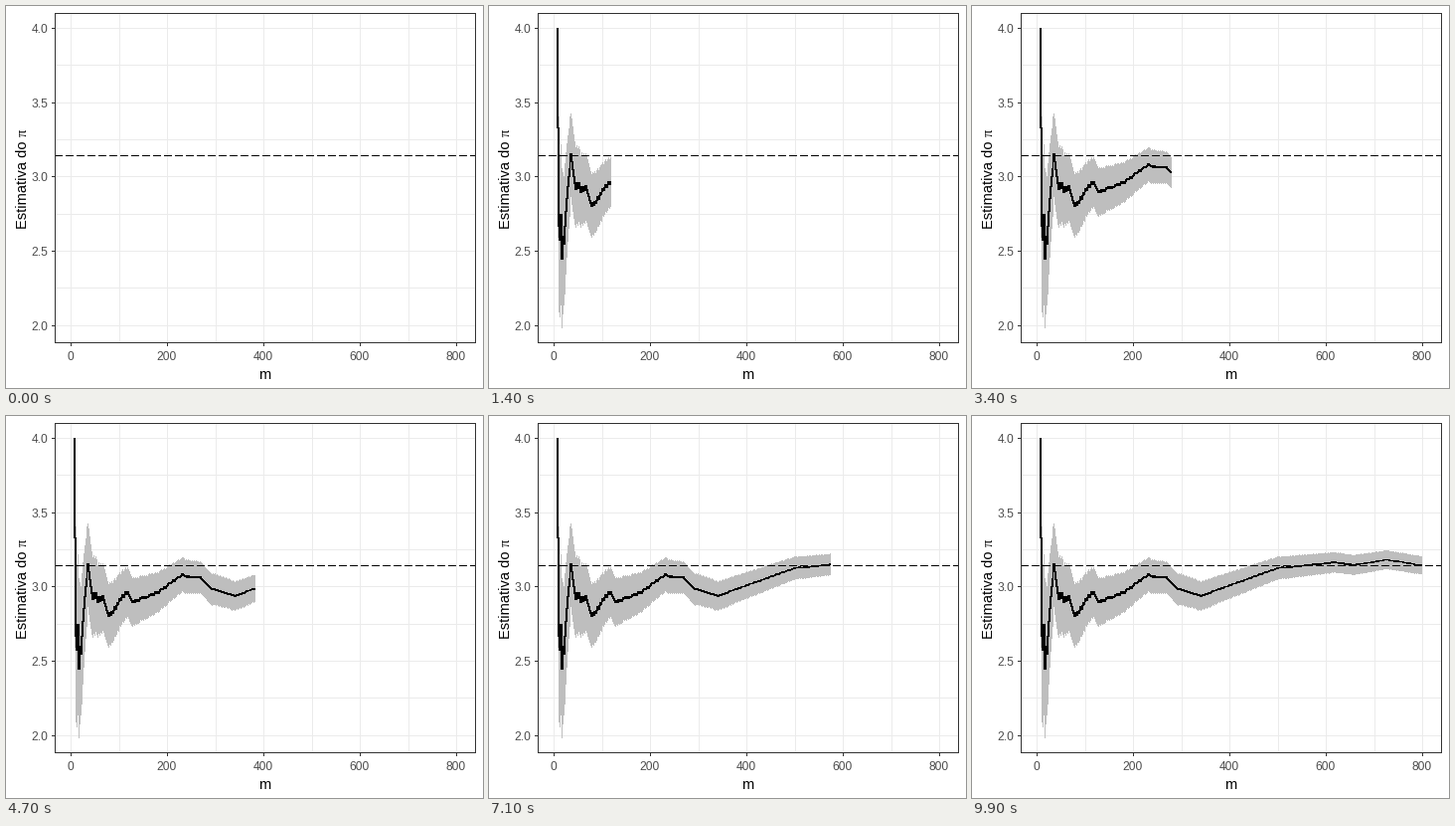
Animation, 480 px wide and 384 px high, one loop 10 s. Source, as a matplotlib script:

```python
import numpy as np
import matplotlib.pyplot as plt
from matplotlib.animation import FuncAnimation
from matplotlib.patches import Polygon

W, H, DPI = 480, 384, 100
PX = 72 / DPI  # points per pixel
FRAMES, STEP = 100, 8
LEFT, RIGHT, TOP, BOTTOM = 49, 472, 7, 338
GRID, EDGE, BAND, TICK_TEXT = "#ebebeb", "#333333", "#bebebe", "#4d4d4d"

# Turning points (m, estimate) that the simulated throws steer towards
TREND = np.array([
    (8, 4.0), (12, 2.667), (16, 2.75), (18, 2.44), (37, 3.135),
    (47, 2.93), (70, 2.92), (81, 2.81), (119, 2.97), (130, 2.90),
    (182, 2.96), (230, 3.08), (270, 3.06), (290, 2.99), (342, 2.94),
    (500, 3.125), (620, 3.165), (660, 3.147), (727, 3.183), (800, 3.145),
])


def to_x(m):
    return np.floor(64.52 + 0.485 * np.asarray(m, float))


def to_y(v):
    return np.floor(22.5 + 149.3 * (4 - np.asarray(v, float)))


def estimates(ms):
    """4 * hits / m, where a throw hits if that keeps nearest to the trend."""
    every = np.arange(STEP, ms[-1] + 1)
    hits, out = STEP, [4.0]
    for m in every[1:]:
        hits += 4 * (hits + 0.5) / m < np.interp(m, *TREND.T)
        out.append(4 * hits / m)
    return np.array(out)[ms - STEP]


ms = np.r_[STEP, 12:STEP * FRAMES + 1:2]
est = estimates(ms)
err = np.sqrt(est * (4 - est) / ms)
# Unsnapped shapes run through pixel centres
xs = to_x(ms) + 0.5
mid, low, high = (to_y(v) + 0.5 for v in (est, est - err, est + err))

fig = plt.figure(figsize=(W / DPI, H / DPI), dpi=DPI, facecolor="white")
ax = fig.add_axes([0, 0, 1, 1])
ax.set(xlim=(0, W), ylim=(H, 0))
ax.axis("off")


def line(x, y, color, z, **kw):
    kw = {"lw": PX, "antialiased": False, "solid_capstyle": "butt", **kw}
    return ax.plot(x, y, color=color, zorder=z, **kw)[0]


def label(x, y, s, size, color="black", font="Liberation Sans", **kw):
    ax.text(x, y, s, fontsize=size * PX, color=color, family=font,
            va="baseline", rotation_mode="anchor", zorder=6, **kw)


TICK, TITLE = 12, 14.67

for m in range(0, 801, 100):
    x = to_x(m) + 1
    line([x, x], [TOP, BOTTOM], GRID, 1)
    if m % 200 == 0:
        line([x, x], [BOTTOM, BOTTOM + 3], EDGE, 1)
        label(x, 356, str(m), TICK, TICK_TEXT, ha="center")

for v in np.arange(2, 4.01, 0.25):
    y = to_y(v)
    line([LEFT, RIGHT], [y, y], GRID, 1)
    if v % 0.5 == 0:
        line([LEFT - 3, LEFT], [y, y], EDGE, 1)
        label(42.5, y + 5, f"{v:.1f}", TICK, TICK_TEXT, ha="right")

line([LEFT, RIGHT, RIGHT, LEFT, LEFT], [TOP, TOP, BOTTOM, BOTTOM, TOP],
     EDGE, 5, solid_capstyle="projecting", solid_joinstyle="miter")

label(260.5, 375, "m", TITLE, ha="center")
label(20.7, 223.5, "Estimativa do", TITLE, ha="left", rotation=90)
label(20.7, 131.4, "π", TITLE, font="Liberation Serif", ha="left", rotation=90)

band = Polygon([(0, 0)] * 3, fc=BAND, lw=0, antialiased=False, snap=False, zorder=2)
ax.add_patch(band)
curve = line([], [], "black", 3, snap=False)
pi_y = to_y(np.pi)
line([LEFT, RIGHT], [pi_y, pi_y], "black", 4, ls=(0, (7, 3)))


def draw(i):
    n = np.searchsorted(ms, STEP * (i + 1), side="right")
    x = xs[:n]
    band.set_xy(np.column_stack([np.r_[x, x[::-1]],
                                 np.r_[high[:n], low[:n][::-1]]]))
    curve.set_data(x, mid[:n])
    return band, curve


anim = FuncAnimation(fig, draw, frames=FRAMES, interval=100, repeat=True,
                     repeat_delay=0, init_func=lambda: draw(0))
plt.show()
```
